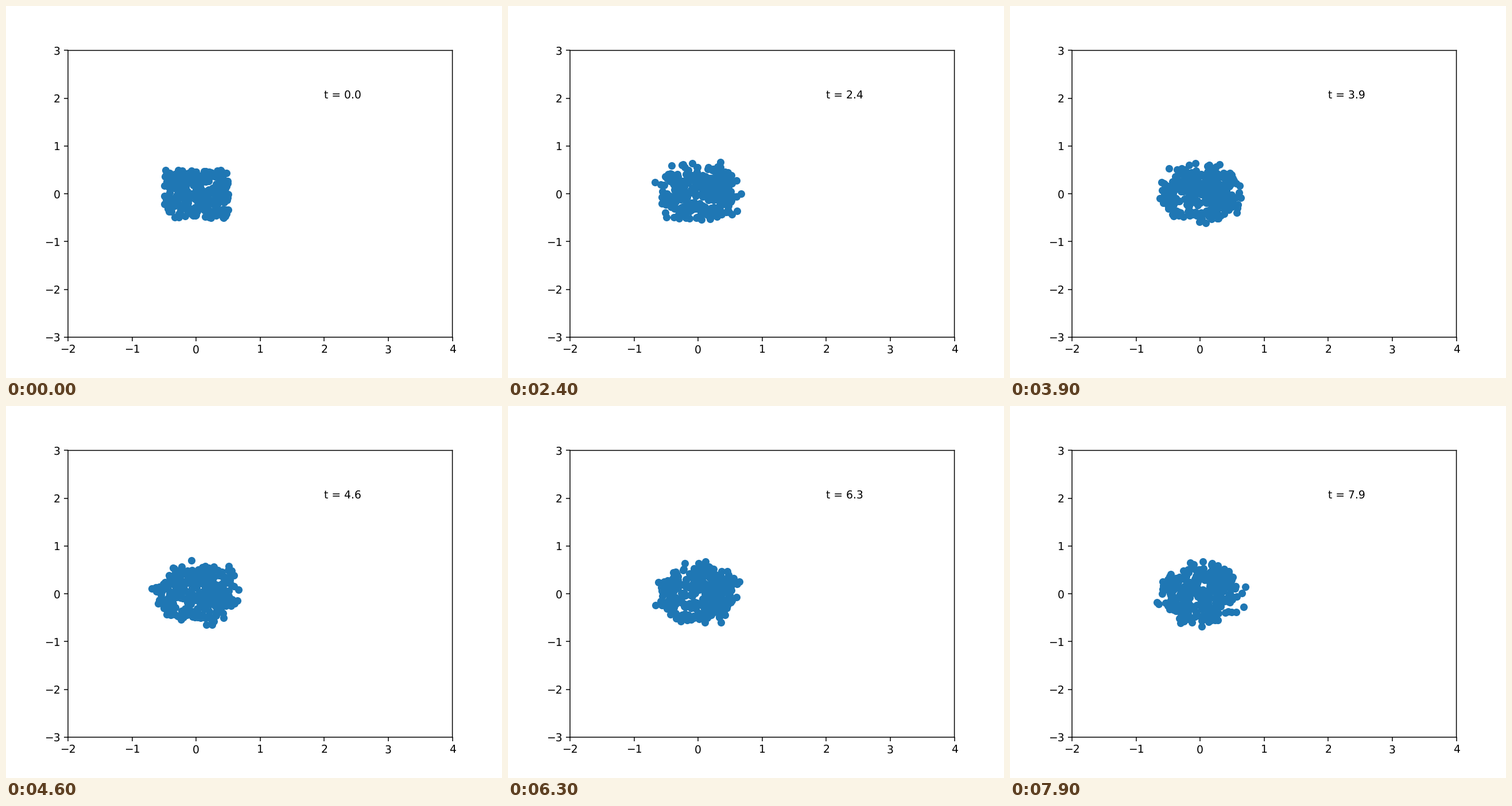
These frames come from a looping animation (864x648 px, 8000 ms). A matplotlib script:

```python
import numpy as np
import matplotlib.pyplot as plt
from matplotlib.animation import FuncAnimation

COUNT, FRAMES, DT = 300, 80, 0.1
NOISE = 0.035          # random step per frame
CORE, PULL = 0.52, 1.2  # free radius, and pull back beyond it

plt.rcParams["path.snap"] = False
plt.rcParams["text.hinting"] = "none"


def step(pts, rng):
    """Random walk with a soft pull back towards a round core."""
    r = np.hypot(*pts.T)[:, None] + 1e-9
    drift = -PULL * np.maximum(r - CORE, 0) * pts / r
    return pts + drift * DT + rng.normal(0, NOISE, pts.shape)


def simulate(seed=4):
    rng = np.random.default_rng(seed)
    path = [rng.uniform(-0.5, 0.5, (COUNT, 2))]
    while len(path) < FRAMES:
        path.append(step(path[-1], rng))
    return path


path = simulate()

fig, ax = plt.subplots(figsize=(6.4, 4.8), dpi=135)
fig.subplots_adjust(left=0.125, right=0.9, bottom=79 / 720, top=634 / 720)
ax.set(xlim=(-2, 4), ylim=(-3, 3))
dots, = ax.plot([], [], "o", color="C0")
label = ax.text(2, 2, "")


def update(i):
    dots.set_data(*path[i].T)
    label.set_text(f"t = {i * DT:.1f}")
    return dots, label


anim = FuncAnimation(fig, update, frames=FRAMES, interval=100,
                     repeat=True, repeat_delay=0)
plt.show()
```
